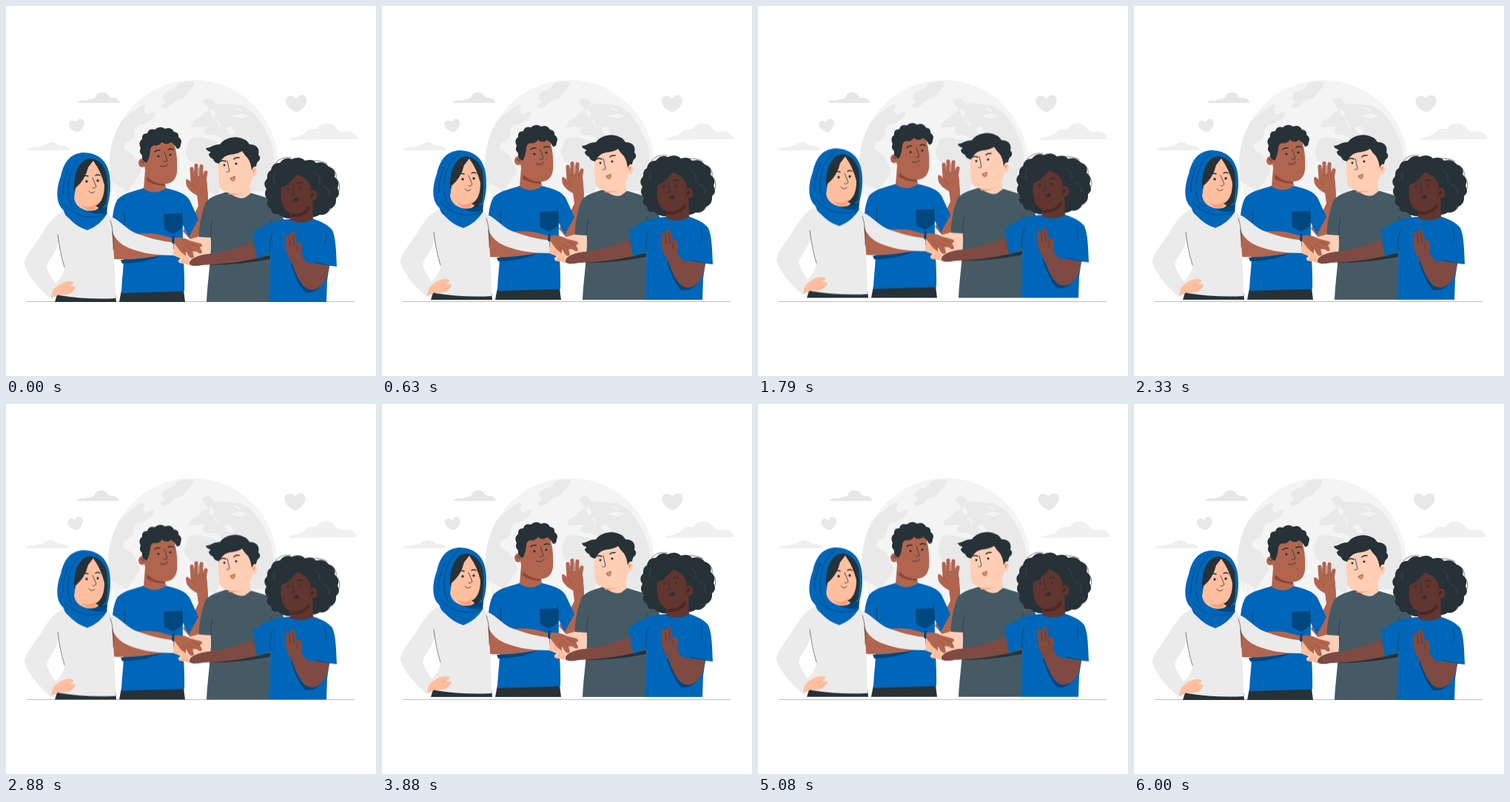
These frames come from a looping animation (500 by 500 pixels, 6.04 s). An HTML page:

```html
<!DOCTYPE html>
<html lang="en">
<head>
<meta charset="utf-8">
<title>Hands together</title>
<style>
html, body { margin: 0; width: 100%; height: 100%; overflow: hidden; background: #fff; }
svg { display: block; width: 100%; height: 100%; }
.sky { animation: shake 6040ms linear infinite; }
.cast { animation: float 6040ms linear infinite; }
/* Six seconds of motion, then one still step before the loop restarts. */
@keyframes float {
  0%, 49.669%, 99.338%, 100% { transform: translateY(0); }
  24.834%, 74.503% { transform: translateY(-7px); }
}
@keyframes shake {
  0%, 99.338%, 100% { transform: translateX(0); }
  9.934%, 89.404% { transform: translateX(-.7px); }
  19.868%, 79.47% { transform: translateX(1.4px); }
  29.801%, 49.669%, 69.537% { transform: translateX(-2.8px); }
  39.735%, 59.603% { transform: translateX(2.8px); }
}
.ink { fill: #263238; }
.blue { fill: #0066b9; }
.navy { fill: #00477f; }
.pale { fill: #ebebeb; }
.slate { fill: #455a64; }
.peach { fill: #ffbf9f; }
.cream { fill: #ffceb5; }
.blush { fill: #fb9d74; }
.tan { fill: #b1654f; }
.rust { fill: #8a4636; }
.brown { fill: #7f4a41; }
.cocoa { fill: #60362f; }
.umber { fill: #4a2823; }
.line { fill: none; stroke: #263238; stroke-width: .8; stroke-linecap: round; stroke-linejoin: round; }
.brow { stroke-width: 1.5; }
.fold { stroke-width: .6; }
.seam { fill: none; stroke: #00477f; stroke-width: 1; stroke-linecap: round; }
.finger { fill: none; stroke: #b1654f; stroke-linecap: round; stroke-width: 5; }
</style>
</head>
<body>
<svg viewBox="0 0 500 500">
  <defs>
    <path id="heart" d="M0 11C-7 8-14 2-13-5C-12-12-3-12 0-6C3-12 12-12 13-5C14 2 7 8 0 11Z"/>
    <clipPath id="globe"><circle cx="253.7" cy="214" r="114"/></clipPath>
  </defs>

  <g class="sky">
    <circle cx="253.7" cy="214" r="114" fill="#f4f4f4"/>
    <g clip-path="url(#globe)" fill="#e9e9e9">
      <path d="M233 105Q244 100 255 103Q253 112 246 116L240 125Q231 124 225 132Q218 140 211 137Q210 133 217 129Q210 126 213 120Q215 115 223 114Q230 111 233 105Z"/>
      <path d="M266 128Q273 122 278 126L284 133Q292 130 302 133L318 134L332 142Q350 160 360 190L368 250L330 250L300 190Q290 174 277 174Q270 176 268 168L272 163L250 164Q251 155 258 153Q264 150 266 145L275 141Z"/>
      <path d="M248 180Q258 175 270 179L284 182L300 215L285 258L266 245L262 215Q242 212 243 195Z"/>
      <path d="M179 137Q188 130 189 136Q184 142 190 147L201 142Q204 150 193 155L186 160Q178 158 174 168Q176 177 166 183Q158 184 160 194L172 201L180 216Q186 223 177 232L165 250L140 236L136 180Q150 157 179 137Z"/>
    </g>
    <g fill="#f4f4f4" stroke="#f4f4f4">
      <path d="M277 139Q285 144 281 150Q276 149 277 139ZM306 149L316 146L327 148L319 152ZM297 165L304 163L309 173L303 174Z"/>
      <path d="M283 154Q290 158 288 164M310 138L319 142" fill="none" stroke-width="2"/>
    </g>
    <path fill="#e6e6e6" d="M97 131C98 127 104 127 108 128C112 125 119 127 121 123C123 116 132 115 137 119C139 123 142 125 145 124C150 124 153 127 154 131Z"/>
    <path fill="#efefef" d="M28 195C31 191 37 191 42 191C46 189 51 190 54 187C58 183 66 183 70 187C73 190 79 188 82 190C85 191 87 193 87 195Z"/>
    <path fill="#f0f0f0" d="M383 181C387 176 395 178 400 174C405 173 407 167 413 166L421 166C426 157 439 156 445 163C448 168 453 171 459 170C468 168 475 174 475 180Z"/>
    <use href="#heart" transform="translate(96 162) rotate(-14) scale(.8)" fill="#e8e8e8"/>
    <use href="#heart" transform="translate(392.5 132) rotate(-3) scale(1.08)" fill="#e8e8e8"/>
  </g>

  <path d="M28 399.5H471.5" stroke="#b4b8ba" stroke-width=".9"/>

  <g class="cast">
    <!-- man in the blue shirt -->
    <g>
      <path class="ink" d="M156 384H240L242 400H153Z"/>
      <path class="tan" d="M257 247L272 245Q275 264 270 281L264 301Q260 316 251 318L239 304L255 280L260 270Z"/>
      <path class="tan" d="M249 236Q256 228 269 230Q274 241 271 252L258 256Q247 250 244 243Q242 234 244.5 234Q248 235 250 239Z"/>
      <path class="finger" d="M252 235L251 220M257 233L257 215.5M263.5 233L264 216.5M268 236L270 225"/>
      <path class="line fold" d="M254.3 222L255 233M260.5 219L260.5 231M266.8 226L266 233M251 239Q255 242 256 246" style="stroke:#8a4636"/>
      <path class="blue" d="M186 246Q200 255 216 246C232 250 242 253 248 262L260 288L247 312L239 296C238 325 242 360 241 385.5L156 388C157 360 161 345 157 330L144 316C142 290 145 270 151 261C160 252 175 250 186 246Z"/>
      <path class="navy" d="M213 281L238 280V300L226 308L214 302Z"/>
      <path class="line fold" d="M239 296L237 275M158 308Q162 292 160 280"/>
      <path class="navy" d="M155 343Q188 343 214 334L204 340Q180 348 157 348Z"/>
      <path class="tan" d="M143 302L176 308Q196 306 208 309L230 315V333Q180 344 146 342Q143 330 143 302Z"/>
      <path class="tan" d="M188 222L186 247Q202 257 216 246L214 233Z"/>
      <path class="rust" d="M191 231Q201 239 214 240L215 243Q200 243 190 236Z"/>
      <path class="tan" d="M187 188L225 182C231 192 232 213 231 225C229 238 220 242 208 240C196 238 189 231 187 216Z"/>
      <ellipse class="tan" cx="184" cy="212" rx="5" ry="6"/>
      <path class="rust" d="M181 210Q186 208 187 214L184 212Z"/>
      <path class="ink" d="M188 211Q183 208 184 202Q179 198 182 192Q178 184 184 180Q183 172 191 172Q193 165 201 167Q208 161 215 166Q223 163 227 170Q234 171 233 177Q239 181 236 187Q236 193 231 193Q228 187 223 184Q217 189 211 184Q205 190 200 188Q195 190 195 195Q194 206 190 212Z"/>
      <path class="line brow" d="M201 197Q204 194 208 195M219 194Q223 192 226 194"/>
      <circle class="ink" cx="206" cy="203" r="1.6"/><circle class="ink" cx="222" cy="201" r="1.6"/>
      <path class="line" d="M214 197L218 209Q216 211 213 210M208 216Q214 219 219 214"/>
    </g>

    <!-- man in the grey shirt -->
    <g>
      <path class="slate" d="M302 250C289 254 277 257 270 265C263 282 261 300 260 315L277 317C277 345 272 375 271 400H360C359 370 357 340 357 315L376 290C370 276 362 264 352 259L332 253Z"/>
      <path class="line fold" d="M277 317Q276 300 279 290M357 320Q355 300 358 288"/>
      <path class="ink" d="M276 347Q318 346 357 337L357 342Q315 350 276 350Z"/>
      <path class="cream" d="M301 242L301 251Q311 262 323 259L331 253L328 233Z"/>
      <path class="blush" d="M301 248Q317 252 328 243Q322 256 301 255Z"/>
      <path class="cream" d="M288 199L319 190L334 211C334 227 332 244 324 250C312 256 294 254 289 245C286 232 287 214 288 199Z"/>
      <ellipse class="cream" cx="334" cy="224" rx="5" ry="7"/>
      <path class="blush" d="M333 223Q334 218 337 221L335 226Z"/>
      <path class="ink" d="M270 192C276 192 280 187 289 187C295 178 311 174 321 180C325 181 327 184 329 187C340 187 343 194 341 201Q345 204 342 209Q339 210 338 217Q334 216 332 222Q331 212 327 206Q322 201 319 196C311 202 302 199 295 204Q290 208 288 213Q281 212 280 207Q274 204 274 200Q277 198 276 197Q271 196 270 192Z"/>
      <path class="line brow" d="M290 210Q293 208 297 210M308 207Q311 204 315 205"/>
      <circle class="ink" cx="295" cy="215" r="1.5"/><circle class="ink" cx="311" cy="213" r="1.6"/>
      <path class="line" d="M299 209L302 223Q300 225 298 224"/>
      <path d="M303 232.5Q306 232 309 230Q310 236 306.5 236.5Q304 236 303 232.5Z" fill="#f58a4c" stroke="#5b4038" stroke-width=".6"/>
    </g>

    <!-- girl with curly hair -->
    <g>
      <path class="ink" d="M386 287Q374 288 368 281Q359 283 358 274Q350 270 354 262Q347 255 352 247Q346 240 353 233Q352 225 358 222Q360 211 370 212Q377 203 386 207Q397 202 404 209Q414 206 419 212Q430 209 436 217Q447 221 444 231Q452 237 448 246Q453 255 446 260Q447 271 438 274Q433 284 424 282Q414 289 407 281Z"/>
      <path class="line fold" d="M364 212Q372 203 385 205M410 209Q425 208 434 213M440 219Q448 225 446 233Q453 240 450 250M444 265Q442 275 432 280"/>
      <path d="M416 224Q426 230 424 240M428 244Q438 246 437 258M364 225Q359 233 364 240" fill="none" stroke="#455a64" stroke-width=".6"/>
      <path class="blue" d="M386 288C374 288 361 290 352 295L333 306L340 342L357 333C358 360 356 380 355 400H433L434 371L437 351L447 352C446 332 446 314 441 303C435 295 425 291 413 287Z"/>
      <path class="cocoa" d="M384 271L384 289Q398 297 415 288L414 260Z"/>
      <path class="umber" d="M385 281Q401 282 409 270L411 273Q404 286 385 285Z"/>
      <path class="cocoa" d="M372 245Q385 239 393 228Q407 231 412 245L410 267C405 280 392 284 380 278C371 271 371 254 372 245Z"/>
      <ellipse class="cocoa" cx="415" cy="256" rx="5.5" ry="7"/>
      <path class="umber" d="M411 256Q414 250 417 254L413 260Z"/>
      <path class="line brow" d="M376 243Q378 240 382 241M394 240Q398 237 401 239"/>
      <circle class="ink" cx="381" cy="247" r="1.5"/><circle class="ink" cx="397" cy="246" r="1.5"/>
      <path class="line" d="M387 241L389 255L385 255"/>
      <path class="ink" d="M388 262Q391 260 393 258Q396 260 395.5 263Q391 265 388 262Z"/>
      <path class="line fold" d="M357 333Q356 316 360 306M431 322Q434 312 431 304M437 351L417 346"/>
      <path class="navy" d="M385 348Q392 374 404 387Q421 389 429 373L413 379L394 348Z"/>
      <path class="brown" d="M411 347L437 351Q435 366 428 376Q418 387 407 382Q396 377 385 343L399 336Q403 346 412 349Z"/>
      <path class="brown" d="M379 325Q378 314 381 312L387 305Q390 304 391 309L392 319Q396 321 399 319Q401 322 399 340L386 346Q378 336 377 320Q376 306 380 307Z"/>
      <path class="line fold" d="M384 324L383 313M389 324L388 309M391 321Q395 325 393 331" style="stroke:#552d29"/>
    </g>

    <!-- woman in the headscarf -->
    <g>
      <path class="ink" d="M69 390H148L149 400H66Z"/>
      <path class="pale" fill-rule="evenodd" d="M78 277C62 284 55 298 46 312C37 326 25 339 25 349C29 365 46 384 61 396L68 378L72 391Q110 397 148 395C148 365 146 320 140 282ZM71 318C70 331 56 343 55 353Q59 365 67 375Q79 365 79 352Z"/>
      <path class="line fold" d="M70 309Q73 334 79 353"/>
      <path class="peach" d="M61 395C62 386 64 381 70 378C78 372 86 371 91 373Q92 376 86 378L93 379Q95 382 91 384L88 388Q79 392 72 390Z"/>
      <path class="line fold" d="M86 378L80 381M91 384L83 386" style="stroke:#fb9d74"/>
      <path class="pale" d="M139 284C150 286 160 299 173 306C190 313 210 318 229 320L227 337C199 337 177 333 160 324C147 316 141 305 139 284Z"/>
      <path class="line fold" d="M141 290Q146 303 145 329"/>
      <path class="blue" d="M105 198C86 199 78 212 74 230C67 249 68 266 76 274C80 278 77 280 84 286Q96 299 110 303Q128 296 137 280C134 276 141 262 141 245C142 222 135 199 105 198Z"/>
      <path class="navy" d="M91 258Q94 274 112 277L137 271L136 280Q108 286 91 258Z"/>
      <path class="seam" d="M104 202Q85 216 84 245Q83 262 91 273M79 268Q100 293 135 282M77 255Q76 238 84 220"/>
      <path class="ink" d="M92 248C91 228 98 207 114 206C130 208 138 225 137 247Q136 269 128 275L104 267Z"/>
      <path class="peach" d="M94 246Q107 235 111 218L118 209C123 218 133 228 133 241C134 258 130 273 120 276C107 279 94 272 92 260Z"/>
      <path class="ink" d="M118 207Q130 210 136 226Q139 248 135 268L127 274L121 270Q133 264 133 242Q129 226 118 207Z"/>
      <path class="blush" d="M102 269Q111 275 122 267L120 275Q108 278 102 269Z"/>
      <path class="line brow" d="M104 231Q107 228 111 230M121 229Q124 227 127 229"/>
      <circle class="ink" cx="109" cy="237" r="1.7"/><circle class="ink" cx="124" cy="236" r="1.7"/>
      <path class="line" d="M117 232L122 244Q120 247 117 246M112 250Q115 255 120 251"/>
    </g>

    <!-- stacked hands -->
    <g>
      <path class="cream" d="M260 312L277 313L276 333L252 348Q247 352 244 349L234 347Q231 344 236 341L226 337L228 320Z"/>
      <path class="brown" d="M248 346Q252 338 273 335Q306 331 333 319L339 341Q305 349 266 350Q252 353 248 349Z"/>
      <path class="tan" d="M226 313Q240 312 248 317L263 321Q268 324 262 326L265 332Q264 337 258 332L252 331L254 339Q251 343 247 338L243 331L243 340Q239 342 237 335L226 329Z"/>
      <path class="line fold" d="M250 321L261 326M244 324L254 332M239 327L243 332" style="stroke:#8a4636"/>
      <path class="peach" d="M227 320L236 332L246 340L246 349L234 347L240 340L226 337Z"/>
      <path class="line fold" d="M240 340L238 347M246 341L245 349" style="stroke:#fb9d74"/>
      <path class="navy" d="M225 310H228L227 322L224 320Z"/>
    </g>
  </g>
</svg>
</body>
</html>
```
